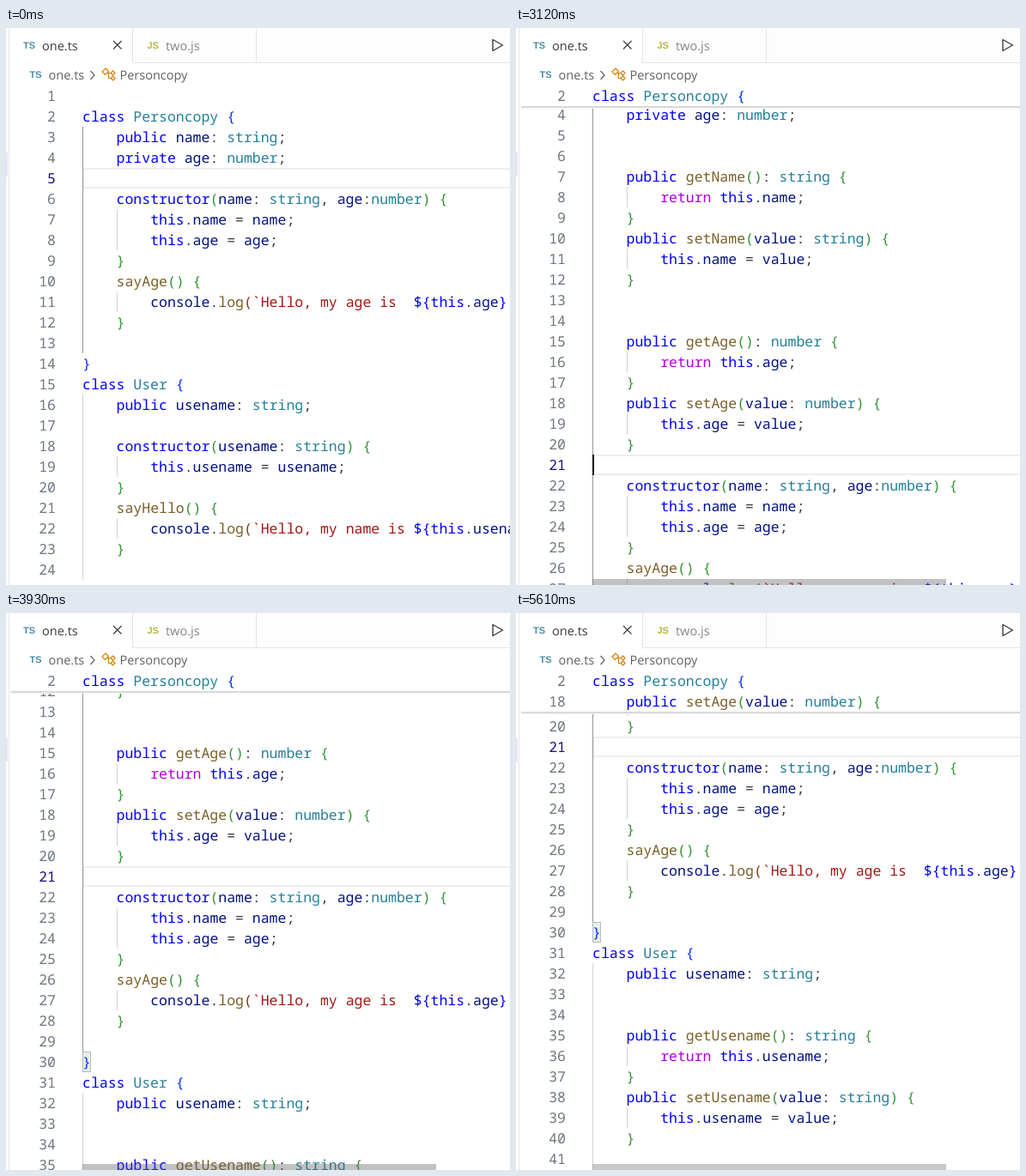
Recreate the animation shown at these times as an HTML page. Size 587 px wide and 649 px high, loop 5.73 s.

```html
<!DOCTYPE html>
<html lang="en">
<head>
<meta charset="utf-8">
<title>Code editor</title>
<style>
  html, body { margin: 0; width: 100%; height: 100%; overflow: hidden; background: #fff; }
  svg { display: block; }
  text { white-space: pre; text-rendering: geometricPrecision; }
  .code { font: 16.493px "Noto Sans Mono", monospace; font-variant-ligatures: none; }
  .ui { font: 14.5px "Open Sans", sans-serif; }
  .badge { font: bold 11px "Liberation Sans", sans-serif; }
</style>
</head>
<body>
<svg width="587" height="649" viewBox="0 0 587 649">
  <rect width="587" height="649" fill="#fff"/>
  <g id="editor"></g>
  <rect width="587" height="67" fill="#fff"/>
  <rect x="148" width="439" height="40" fill="#fdfdfd"/>
  <path d="M147.5 0V40.5H587M291.5 0V40" fill="none" stroke="#e5e5e5"/>
  <path d="M3.5 0V649" stroke="#e5e5e5"/>
  <rect y="145" width="2" height="28" fill="#e6e4f8"/>
  <g class="badge">
    <text x="20" y="24" fill="#498ba7">TS</text>
    <text x="164.5" y="24" fill="#b7b73b">JS</text>
    <text x="27.5" y="58" fill="#498ba7">TS</text>
  </g>
  <g class="ui">
    <text x="42" y="26" fill="#3b3b3b">one.ts</text>
    <text x="186" y="26" fill="#868686">two.js</text>
    <text x="49.5" y="60" fill="#616161">one.ts</text>
    <text x="132.5" y="60" fill="#616161">Personcopy</text>
  </g>
  <g fill="none" stroke-width="1.2">
    <path d="M125 15l9.500 9.500m0-9.500l-9.500 9.500" stroke="#3b3b3b"/>
    <path d="M567 13.500v13l11.500-6.500z" stroke="#3b3b3b" stroke-width="1.4" stroke-linejoin="round"/>
    <path d="M98.500 50l4.500 5-4.500 5" stroke="#616161"/>
    <path d="M116 47l3.500 3.500-4 4-3.500-3.500zM118 52.500h4M119.500 52.500v6h2.500M124.500 50l2.500 2.500-2.500 2.500-2.500-2.500zM124.500 56l2.500 2.500-2.500 2.500-2.500-2.500z" stroke="#d67e00"/>
  </g>
</svg>
<script>
const LOOP = 5730, TOP = 67, ROW = 24, LEFT = 89, CHAR = 9.896;
const COLOR = { key: '#0000ff', flow: '#af00db', type: '#267f99', name: '#001080',
                call: '#795e26', str: '#a31515', plain: '#3b3b3b' };
const BRACKETS = ['#0431fa', '#319331', '#7b3814'];

const method = (head, ...body) => ['    ' + head + ' {', ...body.map(b => '        ' + b), '    }'];
const accessors = (prop, type) => {
  const cap = prop[0].toUpperCase() + prop.slice(1);
  return [...method(`public get${cap}(): ${type}`, `return this.${prop};`),
          ...method(`public set${cap}(value: ${type})`, `this.${prop} = value;`)];
};
const person = ['', 'class Personcopy {', '    public name: string;', '    private age: number;'];
const personEnd = [
  ...method('constructor(name: string, age:number)', 'this.name = name;', 'this.age = age;'),
  ...method('sayAge()', 'console.log(`Hello, my age is  ${this.age}`);'), '', '}'];
const user = ['class User {', '    public usename: string;'];

const before = parse([...person, '', ...personEnd, ...user, '',
  ...method('constructor(usename: string)', 'this.usename = usename;'),
  ...method('sayHello()', 'console.log(`Hello, my name is ${this.usename}`);'), '', '}']);
const after = parse([...person, '', '', ...accessors('name', 'string'), '', '',
  ...accessors('age', 'number'), '', ...personEnd,
  ...user, '', '', ...accessors('usename', 'string'), '', '']);

function wordColor(word, prev, next) {
  if (/^(class|public|private|constructor|this)$/.test(word)) return COLOR.key;
  if (word === 'return') return COLOR.flow;
  if (/^(string|number)$/.test(word) || prev === 'class') return COLOR.type;
  return next === '(' ? COLOR.call : COLOR.name;
}

// Colours each line and records its indent guides and its block's last line.
function parse(lines) {
  const blocks = [], rows = [];
  let depth = 0;
  lines.forEach((src, i) => {
    const tokens = src.trim().match(/\$\{|\w+|\s+|./g) || [];
    let quoted = false, inner = false, prev = '', html = '';
    if (src.trim() === '}') rows[blocks.pop()].end = i;
    const guides = src.trim() === '}' ? depth - 1 : depth;
    tokens.forEach((tok, k) => {
      let fill = COLOR.plain;
      if (tok === '`') { quoted = !quoted; fill = COLOR.str; }
      else if (tok === '${') { inner = true; fill = COLOR.key; }
      else if (tok === '}' && inner) { inner = false; fill = COLOR.key; }
      else if (quoted && !inner) fill = COLOR.str;
      else if (/[({]/.test(tok)) fill = BRACKETS[depth++];
      else if (/[)}]/.test(tok)) fill = BRACKETS[--depth];
      else if (/\w/.test(tok)) { fill = wordColor(tok, prev, tokens[k + 1]); prev = tok; }
      html += `<tspan fill="${fill}">${tok}</tspan>`;
    });
    if (src.endsWith('{')) blocks.push(i);
    rows.push({ html, guides, x: LEFT + src.search(/\S|$/) * CHAR, end: 0 });
  });
  return rows;
}

const rect = (x, y, w, h, fill, more = '') =>
  `<rect x="${x}" y="${y}" width="${w}" height="${h}" fill="${fill}" ${more}/>`;

function line(row, i, y, active) {
  return `<text x="58" y="${y + 18}" text-anchor="end" fill="${active ? '#171184' : '#6e7681'}">${i + 1}</text>` +
    `<text x="${row.x}" y="${y + 18}">${row.html}</text>`;
}

// The last [time, value] step that has begun.
const step = (t, list) => list.reduce((v, [at, val]) => t >= at ? val : v, list[0][1]);

const SCROLL = [[0, 0], [3120, 50], [3160, 101], [3240, 151], [3280, 201],
                [3930, 252], [3970, 302], [4050, 352], [4090, 403]];
const CARET = [[0, 0], [610, 1], [1060, 0], [1600, 1], [2590, 0], [3040, 1],
               [3480, 0], [3970, 1], [4500, 0], [4950, 1], [5450, 0]];
const BAR = [[0, 0], [80, .13], [120, .27], [200, .4], [5530, .385], [5610, .35]];

function sticky(rows, scroll) {
  if (scroll <= ROW) return '';
  const yOf = i => TOP + i * ROW - scroll;
  const second = TOP + ROW;
  let out = '', bottom = second;
  rows.forEach((row, i) => {
    if (row.guides !== 1 || !row.end || yOf(i) >= second || yOf(row.end) <= second) return;
    const y = Math.min(second, yOf(row.end) - ROW);
    bottom = y + ROW;
    out += rect(6, y, 581, ROW, '#fff') + line(row, i, y);
  });
  const shadow = ['#d6d6d6', '#dedede', '#f2f2f2'].map((c, k) => rect(6, bottom + k, 581, 1, c)).join('');
  return shadow + out + rect(6, TOP, 581, ROW, '#fff') + line(rows[1], 1, TOP);
}

function scene(t) {
  const pasted = t >= 2050, rows = pasted ? after : before;
  const current = pasted ? 20 : 4, scroll = step(t, SCROLL), close = rows[1].end;
  const yOf = i => TOP + i * ROW - scroll;
  const cy = yOf(current);
  let out = rect(90, cy + 1, 500, 22, 'none', 'stroke="#eee" stroke-width="2"');
  let text = '';
  rows.forEach((row, i) => {
    const y = yOf(i);
    if (y < TOP - ROW || y > 649) return;
    for (let g = 0; g < row.guides; g++)
      out += rect(Math.round(LEFT + g * 4 * CHAR), y, 1, ROW, g === 0 && i < close ? '#939393' : '#d3d3d3');
    text += line(row, i, y, i === current);
  });
  if (t >= 650)
    for (const [x, i] of [[LEFT + 168, 1], [LEFT, close]])
      out += rect(x + .5, yOf(i) + .5, 9, 23, '#e5f0e5', 'stroke="#b9b9b9"');
  out += text;
  if (step(t, CARET)) out += rect(LEFT, cy, 2, ROW, '#000');
  out += sticky(rows, scroll);
  return out + rect(LEFT, 642, 412, 7, '#646464', `opacity="${step(t, BAR)}"`);
}

const editor = document.getElementById('editor');
editor.setAttribute('class', 'code');
let shown = '';
function draw(now) {
  const markup = scene(now % LOOP);
  if (markup !== shown) editor.innerHTML = shown = markup;
}
const start = performance.now();
function tick() {
  draw(performance.now() - start);
  requestAnimationFrame(tick);
}
draw(0);
requestAnimationFrame(tick);
</script>
</body>
</html>
```
